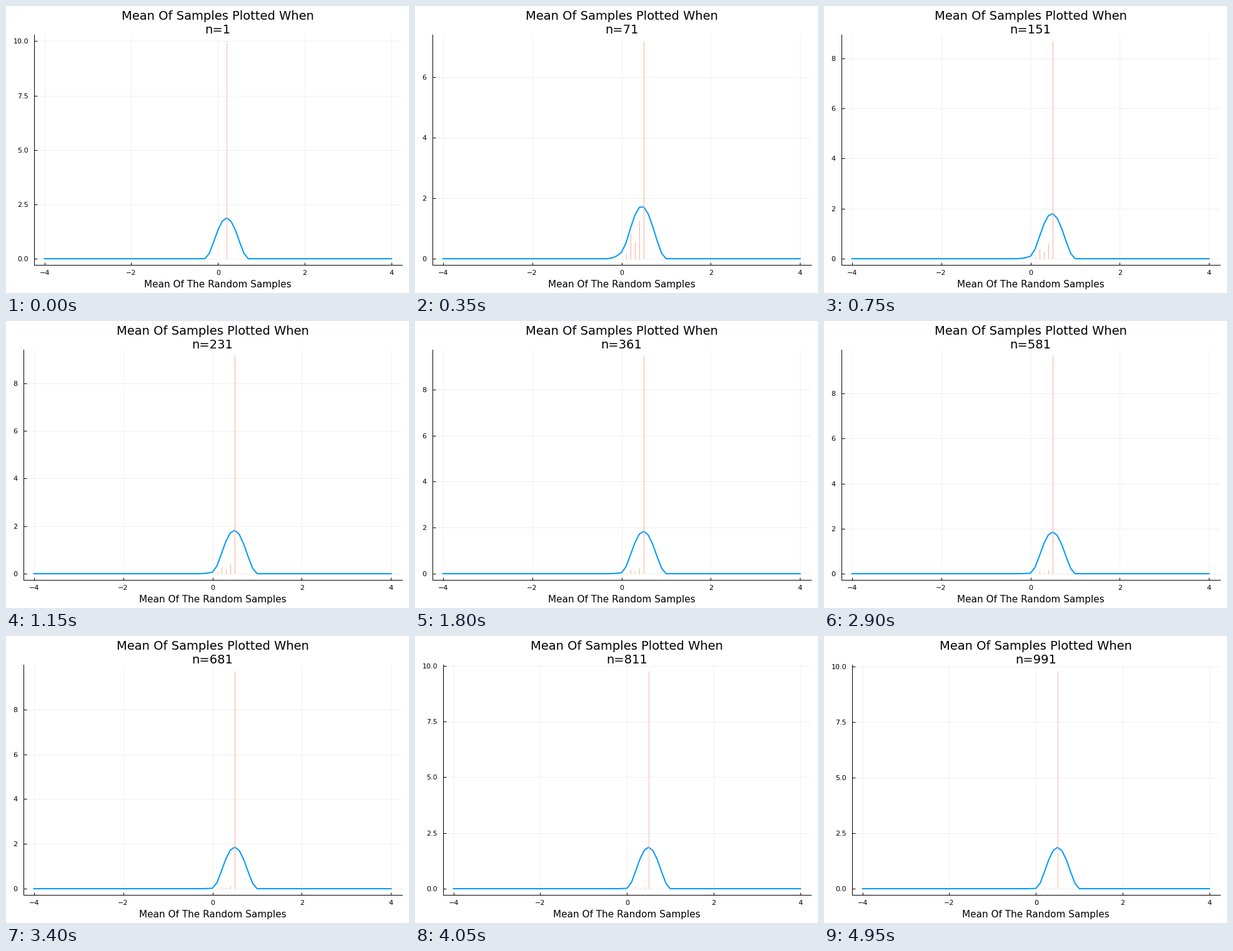
Animation of 645 by 460 pixels, one loop 5 s. Source, as a matplotlib script:

```python
import matplotlib.pyplot as plt
import numpy as np
from matplotlib.animation import FuncAnimation

W, H, DPI = 645, 460, 100
PX = 72 / DPI                     # points per pixel
FRAMES, INTERVAL = 100, 50
RIGHT, TOP, BOTTOM = 633.5, 46, 415.5
BANDWIDTH = 0.5

plt.rcParams["font.family"] = "DejaVu Sans"

# Running means rounded to tenths: they wander at first, then settle at 0.5.
RUNS = [(0.2, 1), (0.1, 1), (0.2, 5), (0.3, 4), (0.4, 9), (0.5, 980)]
MEANS = np.repeat([m for m, _ in RUNS], [c for _, c in RUNS])
LEVELS = np.array([0.1, 0.2, 0.3, 0.4, 0.5])
GRID_X = np.linspace(-4, 4, 81)


def biweight(dist):
    u = np.clip(np.abs(dist) / BANDWIDTH, 0, 1)
    return 15 / 16 * (1 - u**2) ** 2 / BANDWIDTH


KERNELS = biweight(GRID_X[:, None] - LEVELS[None, :])

# The small surplus keeps the pixel size from being rounded down.
fig = plt.figure(figsize=((W + 0.01) / DPI, (H + 0.01) / DPI), dpi=DPI,
                 facecolor="white")
ax = fig.add_axes([0, 0, 1, 1])
ax.set_axisbelow(True)
ax.spines[["top", "right"]].set_visible(False)
ax.spines[["left", "bottom"]].set_linewidth(PX)
ax.grid(color="#f0f0f0", linewidth=PX)
ax.tick_params(direction="in", length=4.5 * PX, width=PX, labelsize=8)
ax.tick_params(axis="x", pad=7 * PX)
ax.tick_params(axis="y", pad=8.8 * PX)
ax.set_xlim(-4.24, 4.24)
ax.set_xticks([-4, -2, 0, 2, 4])

curve, = ax.plot(GRID_X, 0 * GRID_X, color="#009afa", linewidth=2 * PX, zorder=3)
sticks = ax.vlines(LEVELS, 0, 1, linewidth=PX, zorder=4)


def caption(baseline, size, text=""):
    return fig.text(0.5, 1 - baseline / H, text, size=size,
                    ha="center", va="baseline")


title = caption(22.2, 14, "Mean Of Samples Plotted When")
count = caption(44, 14)
label = caption(451.4, 11, "Mean Of The Random Samples")


def set_layout(top):
    """Tick step, label format and left margin follow the axis height."""
    wide = top >= 10
    left = 45 if wide else 27.5
    step = 2.5 if wide else 2 if top >= 6 else 1
    ticks = np.arange(0, top, step)
    ax.set_position([left / W, 1 - BOTTOM / H,
                     (RIGHT - left) / W, (BOTTOM - TOP) / H])
    ax.set_yticks(ticks, [f"{t:.1f}" if wide else f"{t:.0f}" for t in ticks])
    for text in (title, count, label):
        text.set_x((left + RIGHT) / 2 / W)
    sticks.set_color("#f4bdb2" if wide else "#f2b09a")


def draw(frame):
    n = 1 + 10 * frame
    share = np.isclose(MEANS[:n, None], LEVELS).mean(axis=0)
    density = 10 * share
    peak = density.max()
    ax.set_ylim(-0.03 * peak, 1.03 * peak)
    set_layout(1.03 * peak)
    curve.set_ydata(KERNELS @ share)
    sticks.set_segments([[(x, 0), (x, d)] for x, d in zip(LEVELS, density) if d > 0])
    count.set_text(f"n={n}")
    return curve, sticks, count


anim = FuncAnimation(fig, draw, frames=FRAMES, interval=INTERVAL,
                     repeat=True, repeat_delay=0, blit=False)
plt.show()
```
